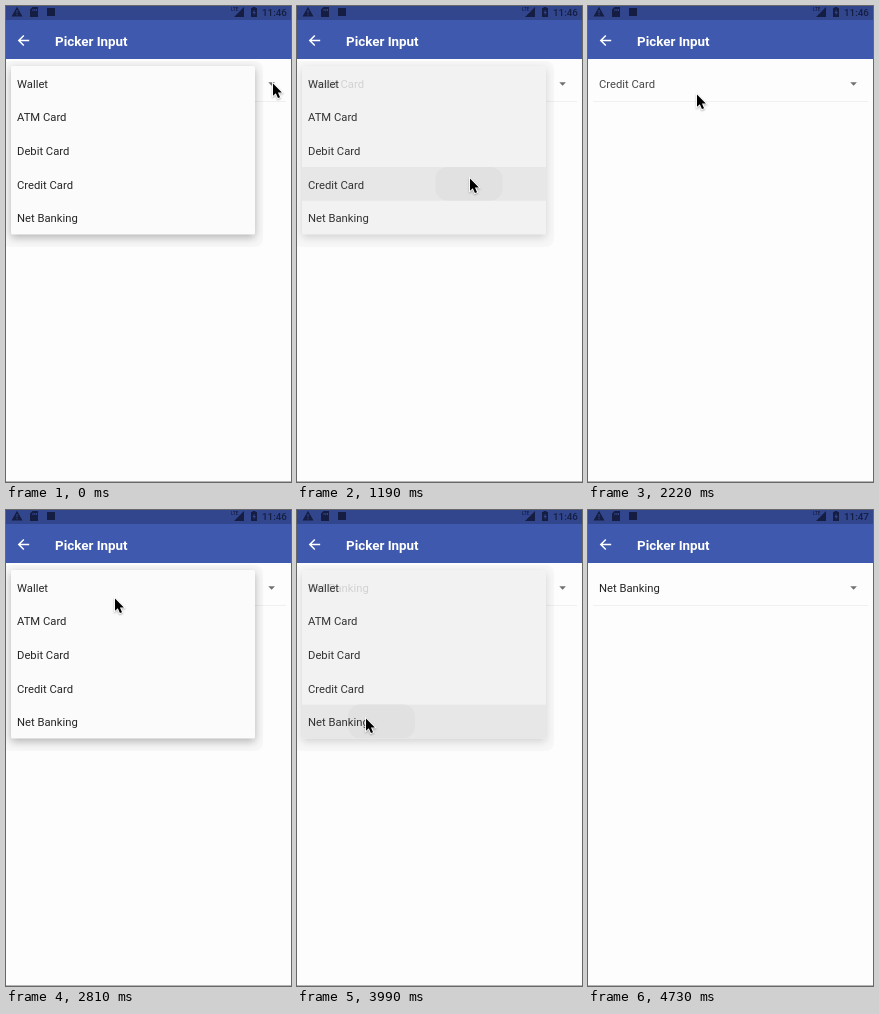
These frames come from a looping animation (285x476 px, 5330 ms). An HTML page with a canvas:

```html
<!DOCTYPE html>
<html lang="en">
<head>
<meta charset="utf-8">
<title>Picker Input</title>
<style>
  html, body { margin: 0; width: 100%; height: 100%; overflow: hidden; background: #fdfdfd; }
  canvas { display: block; width: 285px; height: 476px; }
</style>
</head>
<body>
<canvas id="stage" width="285" height="476"></canvas>
<script>
const ctx = document.getElementById('stage').getContext('2d');
const LOOP = 5330;
const OPTIONS = ['Wallet', 'ATM Card', 'Debit Card', 'Credit Card', 'Net Banking'];
const POPUP = { x: 5, y: 60, w: 244, h: 168.5, row: 33.65 };
const STATUS_INK = '#151e42';
const LABEL = { x: 11, size: 11.25 };

// Pointer positions: [start time, x, y]; no position means hidden
const POINTER = [
  [0, 266, 76], [290, 189, 142], [440, 175, 162], [590, 172, 171],
  [1790, 129, 128], [1930, 112, 102], [2080, 107, 89], [2220, 108, 87],
  [3100, 99, 124], [3250, 74, 199], [3390, 68, 208], [3540, 68, 207],
  [4430, 194, 226], [4580]
];

// Popup states: [start time, state, picked row]
const STATES = [
  [0, 'open', 3], [1040, 'press', 3], [1190, 'leave', 3], [1340, 'closed', 3],
  [2660, 'enter', 3], [2810, 'open', 3], [3990, 'leave', 4], [4140, 'closed', 4]
];

const stepAt = (steps, t) => steps.filter(step => step[0] <= t).pop();

function rect(color, x, y, w, h) {
  ctx.fillStyle = color;
  ctx.fillRect(x, y, w, h);
}

function roundRect(color, x, y, w, h, radius) {
  ctx.fillStyle = color;
  ctx.beginPath();
  ctx.roundRect(x, y, w, h, radius);
  ctx.fill();
}

function shape(color, d) {
  ctx.fillStyle = color;
  ctx.fill(new Path2D(d), 'evenodd');
}

function text(label, x, y, size, color, weight = 400) {
  ctx.font = `${weight} ${size}px Roboto, sans-serif`;
  ctx.fillStyle = color;
  ctx.fillText(label, x, y);
}

function drawHeader(t) {
  rect('#3f59ae', 0, 0, 285, 53);
  rect('#31468c', 0, 0, 285, 14);

  shape(STATUS_INK, 'M11 .8 16.5 10.5H5.5ZM10.5 4v3.2h1V4ZM10.5 8v1.2h1V8Z');
  shape(STATUS_INK, 'M26.5 1H32v10h-8V3.5ZM26.5 3v2h1V3ZM28.3 3v2h1V3ZM30 3v2h1V3Z');
  rect(STATUS_INK, 41, 2, 8, 8);
  text('LTE', 225, 5, 4.5, STATUS_INK, 500);
  shape(STATUS_INK, 'M238 1v10h-10Z');
  shape(STATUS_INK, 'M246.5 1h3v1h1.5v9h-6V2h1.5ZM248.5 3.5l-2 3.5h1.3v2.5l2-3.5h-1.3Z');
  text(t < 4730 ? '11:46' : '11:47', 256, 10, 9.8, STATUS_INK, 500);

  ctx.strokeStyle = '#fff';
  ctx.lineWidth = 1.5;
  ctx.stroke(new Path2D('M23.2 34.5H13M17.8 29.5l-5 5 5 5'));
  text('Picker Input', 49, 39.5, 13.4, '#fff', 600);
}

function drawField(label, ink) {
  rect('#f0f0f0', 5, 95, 275, 1);
  shape('#707070', 'M262.3 76.3h6.6l-3.3 3.5Z');
  text(label, LABEL.x, 82, LABEL.size, ink);
}

function drawPopup(state, picked) {
  const { x, y, w, h, row } = POPUP;
  const leaving = state === 'leave';
  ctx.save();
  if (state === 'enter') ctx.globalAlpha = .65;

  // Wide ambient shadow under the tighter one
  roundRect('rgba(0,0,0,.025)', -4, 55, 261, 186, 8);
  ctx.save();
  ctx.shadowColor = `rgba(0,0,0,${leaving ? .15 : .28})`;
  ctx.shadowBlur = 9;
  ctx.shadowOffsetY = 3;
  roundRect(leaving ? '#f2f2f2' : '#fbfbfb', x, y, w, h, 1.5);
  ctx.restore();

  const top = y + picked * row;
  if (state === 'press') rect('#f6f6f6', x, top, w, row);
  if (leaving) {
    rect('#e7e7e7', x, top, w, row);
    const center = picked === 4 ? 84.5 : 172;
    roundRect('#e1e1e1', center - 33.5, top, 67, row, 12);
    text(OPTIONS[picked], LABEL.x, 82, LABEL.size, '#d2d2d2');
  }
  const ink = leaving ? '#333' : '#262626';
  OPTIONS.forEach((label, i) => text(label, LABEL.x, 81.7 + i * row, LABEL.size, ink));
  ctx.restore();
}

function drawPointer(x, y) {
  ctx.save();
  ctx.translate(x + 1, y + 1.5);
  ctx.scale(.88, .88);
  const arrow = new Path2D('M0 0V14L3.2 11 5.6 16.5 8 15.5 5.6 10.1H10.1Z');
  ctx.shadowColor = 'rgba(0,0,0,.3)';
  ctx.shadowBlur = 2;
  ctx.shadowOffsetY = 1;
  ctx.strokeStyle = '#fff';
  ctx.lineWidth = 2;
  ctx.stroke(arrow);
  ctx.shadowColor = 'transparent';
  ctx.fillStyle = '#000';
  ctx.fill(arrow);
  ctx.restore();
}

function draw(now) {
  const t = now % LOOP;
  const [, state, picked] = stepAt(STATES, t);
  const [, px, py] = stepAt(POINTER, t);
  rect('#fdfdfd', 0, 0, 285, 476);
  drawField(OPTIONS[picked], picked === 4 ? '#262626' : '#484848');
  if (state !== 'closed') drawPopup(state, picked);
  drawHeader(t);
  rect('#b4b4b4', 0, 475, 285, 1);
  if (px !== undefined) drawPointer(px, py);
}

const start = performance.now();
function frame() {
  draw(performance.now() - start);
  requestAnimationFrame(frame);
}
frame();
</script>
</body>
</html>
```
